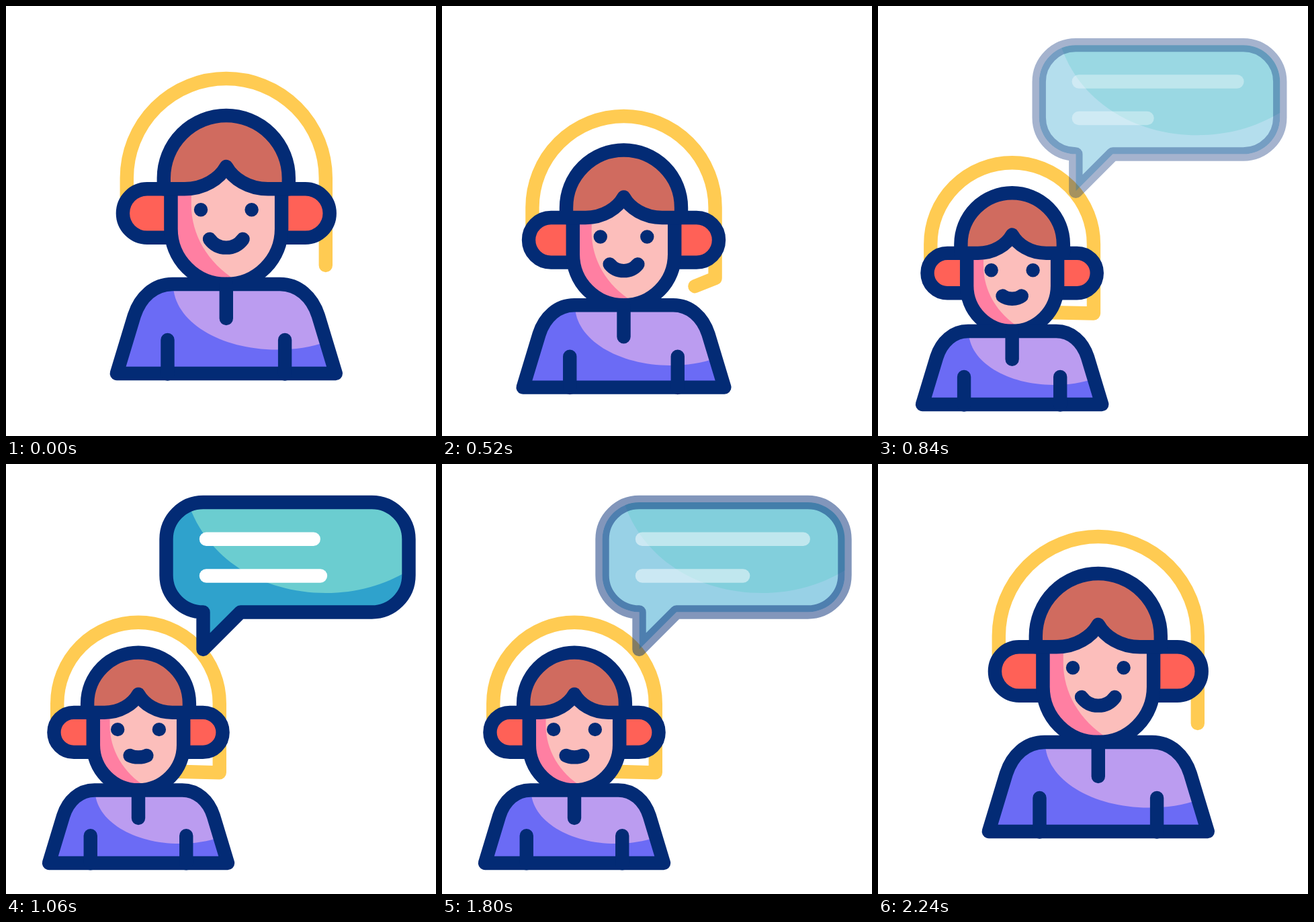
An HTML page with a canvas that plays this animation: 640x640 px, repeating every 2400 ms.

```html
<!DOCTYPE html>
<html lang="en">
<head>
<meta charset="utf-8">
<title>Chat assistant</title>
<style>
  html, body { margin: 0; width: 100%; height: 100%; overflow: hidden; background: #fff; }
  canvas { display: block; width: 640px; height: 640px; }
</style>
</head>
<body>
<canvas id="stage"></canvas>
<script>
const LOOP = 2400, LINE = 20.4;
const NAVY = '#032b75', YELLOW = '#ffcb52';

const canvas = document.getElementById('stage');
const ctx = canvas.getContext('2d');
const ratio = window.devicePixelRatio || 1;
canvas.width = canvas.height = 640 * ratio;

// Shapes in the coordinates of the large resting pose
const ears = [
  'M246 272.3H210.3A36.2 36.2 0 0 0 210.3 344.7H246Z',
  'M410 272.3H445.7A36.2 36.2 0 0 1 445.7 344.7H410Z'
];
const faceFill = 'M245.7 236V331.7A82.3 82.3 0 0 0 410.3 331.7V236Z';
const faceLine = 'M245.7 272.3V331.7A82.3 82.3 0 0 0 410.3 331.7V272.3';
const faceLight = 'M276 230V296C276 340 300 382 342 408L420 420V230Z';
const hair = 'M235 272.3V256A93 93 0 0 1 421 256V272.3H390C361 272.3 338 257 328 239C318 257 295 272.3 266 272.3Z';
const body = 'M165 547H491L465 461C456 433 435 414 408 414H248C221 414 200 433 191 461Z';
const bodyLight = 'M249 400V414C249 470 320 511.5 403 511.5C430 511.5 454 508 480 499V400Z';
const bodyTicks = 'M328 414V465M240.7 497V547.5M415.3 497V547.5';
const eyes = 'M290.2 303.3h.01M365.8 303.3h.01';
const bubble = 'M293.5 220.5V276L349 220.5H544.5A55 55 0 0 0 599.5 165.5V112A55 55 0 0 0 544.5 57H293.5A55 55 0 0 0 238.5 112V165.5A55 55 0 0 0 293.5 220.5Z';
const bubbleLight = 'M271 57C298 140 380 192 476 192C522 192 564 180 602 157V50H271Z';

const mix = (a, b, k) => a + (b - a) * k;
const ramp = (t, a, b) => Math.min(1, Math.max(0, (t - a) / (b - a)));
const smooth = (t, a, b) => {
  const u = ramp(t, a, b);
  return u * u * (3 - 2 * u);
};

// Scales the outline about (cx, cy) moved to (x, y); line weight stays fixed
function placer(x, y, s, cx, cy) {
  const m = new DOMMatrix([s, 0, 0, s, x - s * cx, y - s * cy]);
  return d => {
    const path = new Path2D();
    path.addPath(new Path2D(d), m);
    return path;
  };
}

function fill(path, color) {
  ctx.fillStyle = color;
  ctx.fill(path);
}

function stroke(path, color = NAVY) {
  ctx.strokeStyle = color;
  ctx.stroke(path);
}

function shaded(shape, light, dark, pale) {
  fill(shape, dark);
  ctx.save();
  ctx.clip(shape);
  fill(light, pale);
  ctx.restore();
}

function drawPerson(t, p) {
  const at = placer(mix(327.8, 197, p), mix(547, 594, p), mix(1, 0.816, p), 328, 547);

  const elbow = mix(361, 382, p);
  const tipX = mix(476, 401, p), tipY = mix(386, 380, p);
  stroke(at(`M180 300V256A148 148 0 0 1 476 256V${elbow}L${tipX} ${tipY}`), YELLOW);

  for (const d of ears) {
    const ear = at(d);
    fill(ear, '#ff6157');
    stroke(ear);
  }

  shaded(at(faceFill), at(faceLight), '#ff7fa2', '#fcbebb');
  stroke(at(faceLine));
  fill(at(hair), '#d06b5f');
  stroke(at(hair));
  stroke(at(eyes));

  const q = smooth(t, 280, 1080) - smooth(t, 1800, 2080);
  const talk = 0.5 - 0.5 * Math.cos(2 * Math.PI * ramp(t, 1080, 1800));
  const depth = mix(12.75, 3, q) + 7.3 * talk;
  const w = mix(24.8, 15.2, q);
  const top = 352 - 0.4 * depth, low = top + depth / 0.75;
  stroke(at(`M${328 - w} ${top}C${328 - w / 2} ${low} ${328 + w / 2} ${low} ${328 + w} ${top}`));

  const torso = at(body);
  shaded(torso, at(bodyLight), '#6b6bf5', '#bb9cf0');
  stroke(torso);
  stroke(at(bodyTicks));
}

function drawBubble(t, p) {
  const alpha = ramp(t, 770, 970) - ramp(t, 1700, 1900);
  if (alpha <= 0) return;
  const at = placer(419, 231, 1 - 0.33 * (1 - p), 419, 231);
  const shape = at(bubble);
  ctx.globalAlpha = alpha;

  // Two separate fills, so the pale one hides the dark one while fading
  const rest = new Path2D(shape);
  ctx.save();
  ctx.clip(shape);
  fill(rest, '#2fa2cc');
  fill(at(bubbleLight), '#6bcdd0');
  ctx.restore();
  stroke(shape);

  const first = mix(240, 71, smooth(t, 800, 1340) - smooth(t, 1400, 1810));
  const second = mix(100, 239, smooth(t, 800, 1320) - smooth(t, 1320, 2130));
  stroke(at(`M298 111.7h${first}`), '#fff');
  stroke(at(`M298 166.5h${second}`), '#fff');
  ctx.globalAlpha = 1;
}

function draw(t) {
  ctx.setTransform(ratio, 0, 0, ratio, 0, 0);
  ctx.fillStyle = '#fff';
  ctx.fillRect(0, 0, 640, 640);
  ctx.lineWidth = LINE;
  ctx.lineCap = ctx.lineJoin = 'round';
  const p = smooth(t, 200, 900) - smooth(t, 1800, 2200);
  drawPerson(t, p);
  drawBubble(t, p);
}

const start = performance.now();
function tick() {
  draw((performance.now() - start) % LOOP);
  requestAnimationFrame(tick);
}
tick();
</script>
</body>
</html>
```
